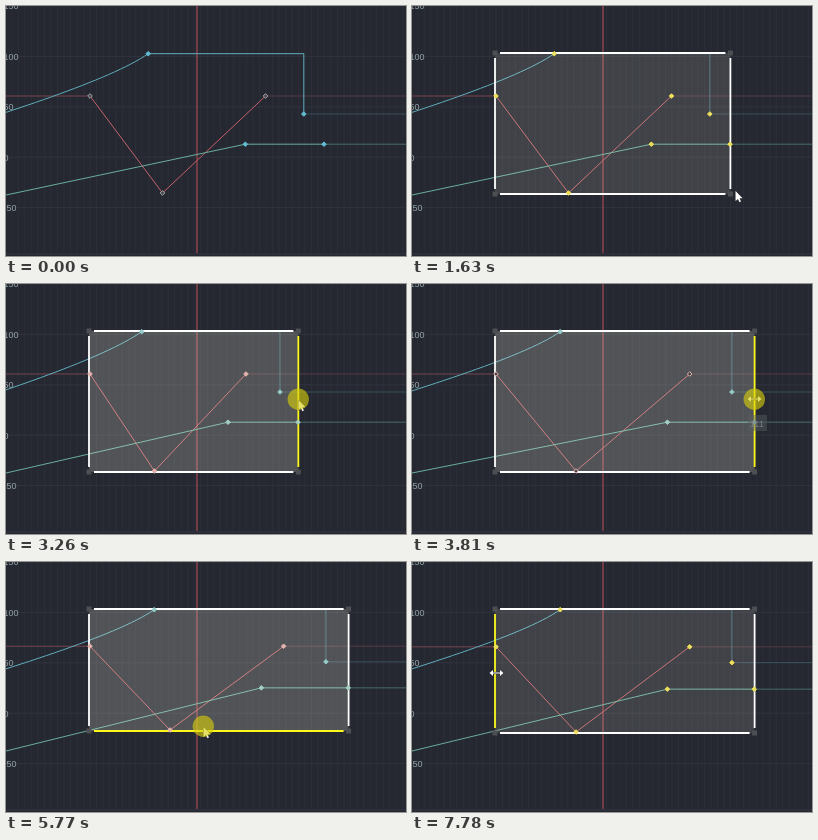
These frames come from a looping animation (400x250 px, 8000 ms). An HTML page with a canvas:

```html
<!DOCTYPE html>
<html lang="en">
<head>
<meta charset="utf-8">
<title>Curve editor: box scaling</title>
<style>
  html, body { margin: 0; width: 100%; height: 100%; overflow: hidden; background: #252831; }
  canvas { display: block; }
</style>
</head>
<body>
<canvas id="stage" width="400" height="250"></canvas>
<script>
const ctx = document.getElementById('stage').getContext('2d');
const LOOP = 8000;
const LEFT = 84, TOP = 47.7, RIGHT = 318, BOTTOM = 187;
const FRAME = 6.515, MIN_BOTTOM = 168;
const YELLOW = '#fdf81c';

const LANES = {
  red: { line: '#c4616b', dot: '#a9a9ac', active: '#e3b3ad', points: [[84, 90], [156.5, 187], [259.5, 90]] },
  blue: { line: '#60adbb', dot: '#62bdd3', active: '#95cbc8', points: [[142.2, 47.7], [297.8, 108]] },
  green: { line: '#69ad9a', dot: '#62bdd3', active: '#a3cfc3', points: [[239.3, 138.2], [318, 138.2]] }
};

// Mouse strokes: start, end, target x, target y
const STROKES = [
  [70, 620, 264, 221], [770, 1010, 263.5, 209], [1090, 1240, 326, 221],
  [1470, 1860, 318, 121], [2640, 2790, 288, 115], [3170, 3720, 342, 115],
  [4360, 5140, 196, 188], [5620, 5770, 197, 164], [6230, 6400, 197, 172.5],
  [7240, 7780, 84, 111]
];

function mouseAt(t) {
  let x = 90, y = 62;
  for (const [from, to, toX, toY] of STROKES) {
    const f = Math.min(1, Math.max(0, (t - from) / (to - from)));
    const eased = f * f * (3 - 2 * f);
    x += (toX - x) * eased;
    y += (toY - y) * eased;
  }
  return [x, y];
}

function line(points, color, width = 1, alpha = 1) {
  ctx.globalAlpha = alpha;
  ctx.strokeStyle = color;
  ctx.lineWidth = width;
  ctx.beginPath();
  points.forEach(p => ctx.lineTo(...p));
  ctx.stroke();
  ctx.globalAlpha = 1;
}

function text(str, x, y, color) {
  ctx.font = '9px "Liberation Sans", Arial, sans-serif';
  ctx.fillStyle = color;
  ctx.fillText(str, x, y);
}

function grid() {
  ctx.fillStyle = '#252831';
  ctx.fillRect(0, 0, 400, 250);
  for (let x = LEFT % FRAME; x < 400; x += FRAME) line([[x, 0], [x, 247]], '#2c2f39');
  for (let i = 0; i < 5; i++) {
    const y = i * 50.4;
    line([[0, y], [400, y]], '#30333d');
    text(150 - i * 50, -2.5, y + 3.3, '#93a5a8');
  }
  line([[0, 248], [400, 248]], '#343743');
  line([[191, 0], [191, 247]], '#964550', 1.4);
}

function curves({ red, blue, green }, stretched) {
  const colors = LANES;
  const extend = (p, color, alpha) => line([p, [400, p[1]]], color, 1, alpha);

  line([[0, red[0][1]], red[0]], colors.red.line, 1, 0.5);
  line(red, colors.red.line);
  extend(red[2], colors.red.line, 0.3);

  const [peak, drop] = blue;
  ctx.strokeStyle = colors.blue.line;
  ctx.beginPath();
  ctx.moveTo(-90, 135);
  ctx.bezierCurveTo(0, 107, peak[0] - 38, peak[1] + 26.5, ...peak);
  ctx.stroke();
  line([peak, [drop[0], peak[1]], drop], colors.blue.line, 1, stretched ? 0.5 : 1);
  extend(drop, colors.blue.line, 0.28);

  line([[0, 189], ...green], colors.green.line);
  extend(green[1], colors.green.line, 0.5);
}

function diamond([x, y], color, hollow) {
  const r = 2.3;
  ctx.beginPath();
  for (const [dx, dy] of [[0, -r], [r, 0], [0, r], [-r, 0]]) ctx.lineTo(x + dx, y + dy);
  ctx.closePath();
  ctx.fillStyle = hollow ? '#45464a' : color;
  ctx.fill();
  ctx.strokeStyle = color;
  ctx.lineWidth = 1;
  ctx.stroke();
}

function selectionBox(points, fill, hot) {
  const xs = points.map(p => p[0]), ys = points.map(p => p[1]);
  const l = Math.min(...xs) - 1, r = Math.max(...xs) + 0.4;
  const t = Math.min(...ys) - 0.7, b = Math.max(...ys) + 1;
  ctx.fillStyle = fill;
  ctx.fillRect(l, t, r - l, b - t);
  ctx.fillStyle = '#4d4f53';
  for (const x of [l, r]) for (const y of [t, b]) ctx.fillRect(x - 2.5, y - 2.5, 5, 5);
  const color = side => side === hot ? YELLOW : '#fff';
  line([[l + 5, t], [r - 5, t]], color('top'), 1.8);
  line([[l + 5, b], [r - 5, b]], color('bottom'), 1.8);
  line([[l, t + 5], [l, b - 5]], color('left'), 1.8);
  line([[r, t + 5], [r, b - 5]], color('right'), 1.8);
}

function pointer(x, y, shape) {
  const half = [[-7, 0], [-3.5, -3], [-3.5, -0.6]];
  const arrow = [[0, 0], [0, 10], [2.4, 8], [4, 11.2], [5.4, 10.5], [4, 7.3], [7, 7.3]];
  const flip = (sx, sy) => half.map(([px, py]) => [px * sx, py * sy]);
  const outline = shape === 'arrow' ? arrow : [
    ...flip(1, 1), ...flip(-1, 1).reverse(), ...flip(-1, -1), ...flip(1, -1).reverse()
  ];
  ctx.save();
  ctx.translate(x + 0.5, y + (shape === 'arrow' ? 1 : 0));
  if (shape === 'ns') ctx.rotate(Math.PI / 2);
  ctx.beginPath();
  outline.forEach(p => ctx.lineTo(...p));
  ctx.closePath();
  ctx.strokeStyle = '#2a2c30';
  ctx.lineWidth = 1;
  ctx.stroke();
  ctx.fillStyle = '#fff';
  ctx.fill();
  ctx.restore();
}

function tooltip(x, y, str) {
  ctx.fillStyle = 'rgba(90,93,99,.45)';
  ctx.fillRect(x - 6, y + 16, 19, 16);
  text(str, x - 4, y + 27.5, '#7c7f85');
}

function draw(t) {
  const within = (from, to) => t >= from && t < to;
  const [mx, my] = mouseAt(t);
  const marquee = within(70, 1470);
  const pressed = marquee || within(2640, 4040) || within(5620, 6940);
  const dragging = pressed && t >= 2790;
  const hot = within(2010, 4360) ? 'right' : within(5210, 7240) ? 'bottom' : t >= 7700 ? 'left' : '';
  const tip = within(3720, 4360) ? '111' : within(6400, 7240) ? '109' : '';
  const resting = tip || !pressed;

  const right = t < 2640 ? RIGHT : t < 3720 ? mx : 342.2;
  const bottom = t < 5620 ? BOTTOM : Math.max(MIN_BOTTOM, Math.min(BOTTOM, mouseAt(Math.min(t, 6400))[1] - 2.5));
  const scaleX = (right - LEFT) / (RIGHT - LEFT);
  const scaleY = (bottom - TOP) / (BOTTOM - TOP);
  const place = ([x, y]) => [LEFT + (x - LEFT) * scaleX, TOP + (y - TOP) * scaleY];
  const placed = {};
  for (const name in LANES) placed[name] = LANES[name].points.map(place);
  const selected = p => t >= 1470 || (marquee && p[0] < mx && p[1] < my);

  grid();
  curves(placed, t >= 1470);

  const chosen = Object.values(placed).flat().filter(selected);
  if (chosen.length) {
    selectionBox(chosen, dragging ? 'rgba(255,252,235,.2)' : 'rgba(255,250,225,.12)', hot);
  }

  for (const name in placed) {
    const { dot, active } = LANES[name];
    for (const p of placed[name]) {
      if (!selected(p)) diamond(p, dot, name === 'red');
      else if (dragging) diamond(p, active, tip && name === 'red');
      else diamond(p, '#eee05a', marquee);
    }
  }

  if (t < 70) return;
  if (marquee) {
    ctx.setLineDash([3, 3]);
    ctx.strokeStyle = '#555860';
    ctx.lineWidth = 1;
    ctx.strokeRect(51.5, 33.5, Math.round(mx - 51.5), Math.round(my - 34));
    ctx.setLineDash([]);
  }
  if (tip) tooltip(mx, my, tip);
  pointer(mx, my, !hot || !resting ? 'arrow' : hot === 'bottom' ? 'ns' : 'ew');
  if (pressed) {
    ctx.fillStyle = 'rgba(215,207,10,.62)';
    ctx.beginPath();
    ctx.arc(mx + 0.3, my + 0.3, 10.7, 0, Math.PI * 2);
    ctx.fill();
  }
}

const start = performance.now();
function tick() {
  draw((performance.now() - start) % LOOP);
  requestAnimationFrame(tick);
}
tick();
</script>
</body>
</html>
```
